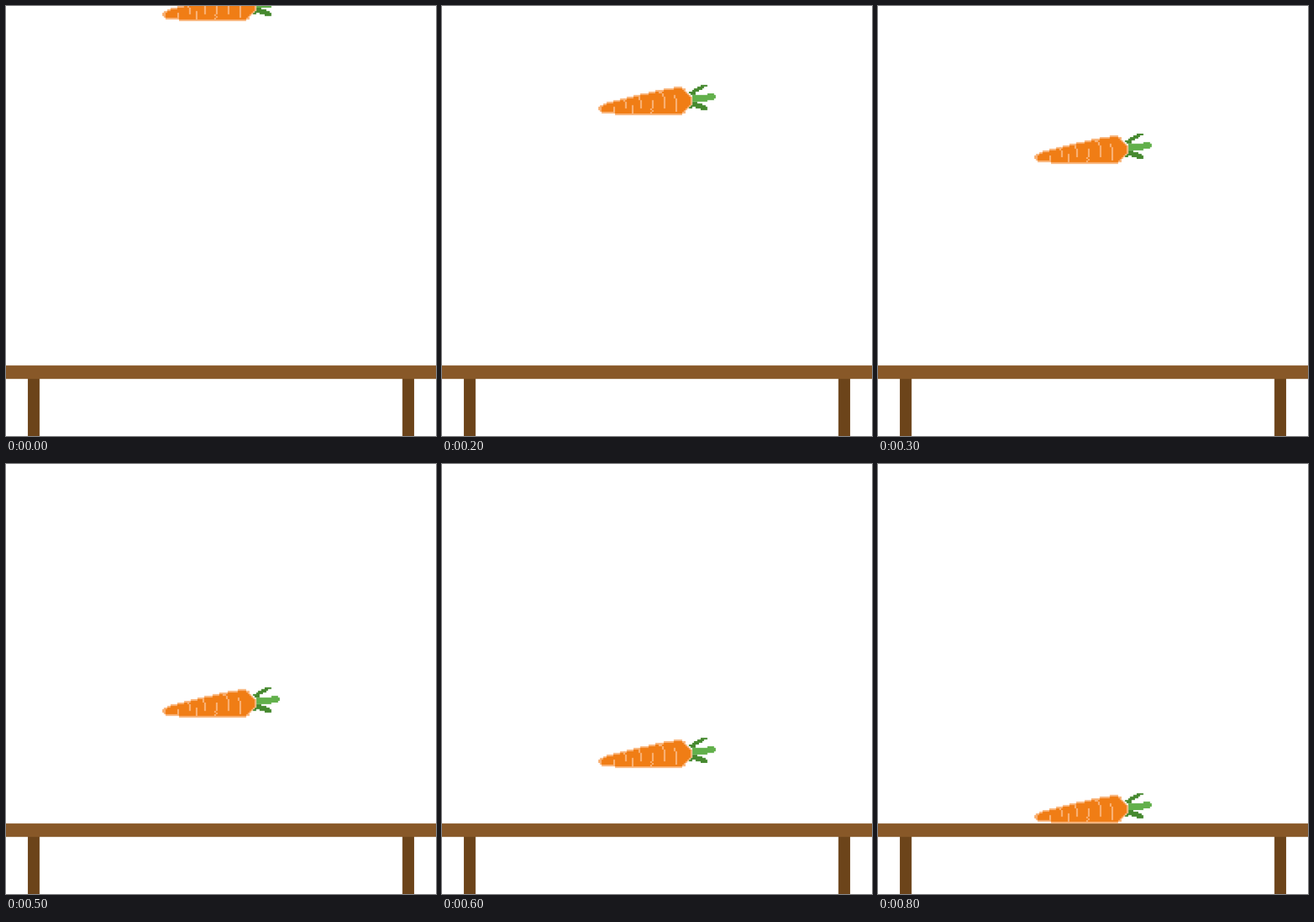
Write an HTML page with a canvas that moves like this. It is 748 px wide and 748 px high and loops after 900 ms.

```html
<!DOCTYPE html>
<html lang="en">
<head>
<meta charset="utf-8">
<title>Falling carrot</title>
<style>
  html, body { margin: 0; height: 100%; overflow: hidden; background: #fff; }
  canvas { display: block; width: 100vw; height: 100vh; }
</style>
</head>
<body>
<canvas id="stage" width="748" height="748"></canvas>
<script>
const ctx = document.getElementById('stage').getContext('2d');
const CELL = 748 / 256;
const STEP = 100;
const LOOP_STEPS = 9;

// Linear interpolation between keys of the form [position, ...values], in whole cells.
function keyed(keys, position) {
  const i = Math.max(1, keys.findIndex(key => key[0] >= position));
  const [start, ...from] = keys[i - 1];
  const [end, ...to] = keys[i];
  const part = (position - start) / (end - start);
  return from.map((value, k) => Math.floor(value + (to[k] - value) * part));
}

// Turns keys of the form [row, left, right] into one span per row.
function trace(keys) {
  const spans = [];
  for (let row = keys[0][0]; row <= keys.at(-1)[0]; row++) {
    spans.push([row, ...keyed(keys, row)]);
  }
  return spans;
}

function addSpans(path, spans) {
  for (const [row, left, right] of spans) path.rect(left, row, right - left, 1);
}

// What remains of a silhouette after removing its one-cell rim.
function withoutRim(spans) {
  return spans.slice(1, -1).map(([row, left, right], i) => {
    const [, leftAbove, rightAbove] = spans[i];
    const [, leftBelow, rightBelow] = spans[i + 2];
    return [row,
      Math.max(left + 1, leftAbove, leftBelow),
      Math.min(right - 1, rightAbove, rightBelow)];
  });
}

function buildLeaves() {
  const dark = new Path2D();
  addSpans(dark, trace([[0, 61, 65.5], [4, 54.5, 58.5], [5, 55, 58]]));
  addSpans(dark, trace([[10, 56.5, 59.5], [12, 55.5, 64.5], [14, 61.5, 65.5]]));
  dark.rect(54, 13, 2, 1);

  const light = new Path2D();
  light.rect(56, 6, 9, 4);
  light.rect(65, 5, 4, 4);
  light.rect(69, 6, 1, 2);
  return [['#46892f', dark], ['#62b04b', light]];
}

function buildBody() {
  const silhouette = trace([
    [1, 45, 50], [2, 39, 52], [7, 17, 56], [10, 5, 56], [11, 3, 56],
    [13, 0, 54.4], [14, 0, 53.6], [16, 2, 52], [17, 10, 50]
  ]);
  const peel = new Path2D();
  const flesh = new Path2D();
  const marks = new Path2D();
  addSpans(peel, silhouette);
  addSpans(flesh, withoutRim(silhouette));

  const ridge = (x, top, bottom) => marks.rect(x, top, 1, bottom - top);
  const hookedRidge = (x, top, bottom) => {
    ridge(x - 1, top, top + 2);
    ridge(x, top + 2, bottom);
  };
  ridge(1, 13, 15);
  ridge(9, 13, 16);
  hookedRidge(16, 8, 14);
  ridge(20, 12, 17);
  hookedRidge(25, 7, 14);
  ridge(32, 9, 14);
  for (let row = 14; row < 17; row++) ridge(31 + row % 2, row, row + 1);
  hookedRidge(39, 5, 14);
  marks.rect(36, 4, 2, 1);
  hookedRidge(46, 6, 16);
  return [['#f9b47a', peel], ['#f07d15', flesh], ['#f9b47a', marks]];
}

const carrot = [...buildLeaves(), ...buildBody()];
const fall = [[0, -9], [2, 47], [3, 76], [4, 103], [6, 163], [8, 196.5]];

function rect(color, x, y, width, height) {
  ctx.fillStyle = color;
  ctx.fillRect(x, y, width, height);
}

function drawTable() {
  for (const x of [13, 236]) rect('#6c441a', x, 215, 7, 41);
  rect('#885828', 0, 214, 256, 8);
}

function render() {
  const step = Math.floor(performance.now() / STEP) % LOOP_STEPS;
  const [top] = keyed(fall, step);
  ctx.setTransform(CELL, 0, 0, CELL, 0, 0);
  rect('#fff', 0, 0, 256, 256);
  drawTable();
  ctx.translate(93, top);
  for (const [color, path] of carrot) {
    ctx.fillStyle = color;
    ctx.fill(path);
  }
  requestAnimationFrame(render);
}
render();
</script>
</body>
</html>
```
